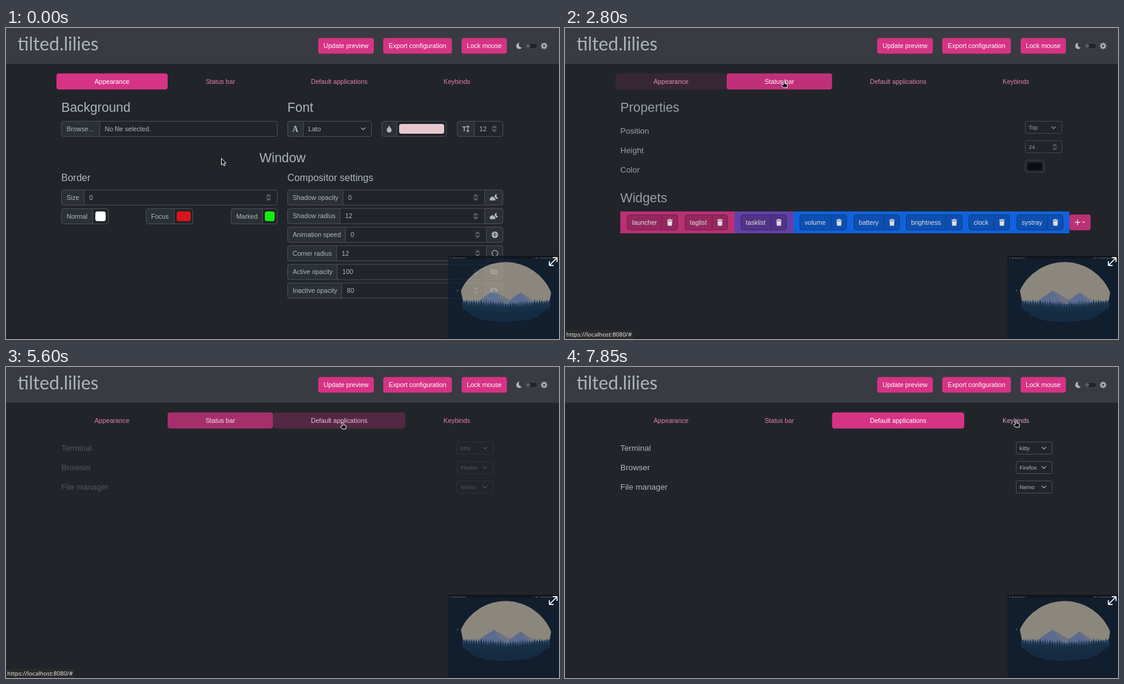
Recreate the animation shown at these times as an HTML page. Size 910 px wide and 512 px high, loop 8000 ms.

```html
<!DOCTYPE html>
<html lang="en">
<head>
<meta charset="utf-8">
<title>Desktop configurator</title>
<style>
html, body { margin: 0; width: 100%; height: 100%; overflow: hidden; background: #212529; }
svg { display: block; width: 910px; height: 512px; font-family: "Liberation Sans", Arial, sans-serif; }
text { white-space: pre; }
</style>
</head>
<body>
<svg id="stage" viewBox="0 0 910 512"></svg>
<script>
const GREY = '#adb5bd', PINK = '#d63384', LINE = '#495057', ADDON = '#2b3035';
const BODY = 10.667, SMALL = 9.333, LABEL = 13.333, SUB = 16, HEAD = 21.333;

// Drawing helpers; text is centred vertically on y, with its baseline on a whole pixel
const text = (x, y, s, size = BODY, fill = GREY, extra = '') =>
  `<text x="${x}" y="${Math.round(y + size * .355)}" font-size="${size}" fill="${fill}" ${extra}>${s}</text>`;
const centred = (x, y, s, size, fill, extra = '') => text(x, y, s, size, fill, 'text-anchor="middle" ' + extra);
const rect = (x, y, x2, y2, fill, r = 0, extra = '') =>
  `<rect x="${x}" y="${y}" width="${x2 - x}" height="${y2 - y}" rx="${r}" fill="${fill}" ${extra}/>`;
const path = (d, fill, extra = '') => `<path d="${d}" fill="${fill}" ${extra}/>`;
const stroke = (d, colour = GREY, w = 1.3) =>
  path(d, 'none', `stroke="${colour}" stroke-width="${w}" stroke-linecap="round" stroke-linejoin="round"`);
const at = (x, y, s) => `<g transform="translate(${x} ${y})">${s}</g>`;
const frame = (x, y, x2, y2, fill = 'none', line = LINE, r = 3.5) =>
  rect(x + .5, y + .5, x2 - .5, y2 - .5, fill, r, `stroke="${line}"`);
const chevron = (x, y) => stroke(`M${x - 3.3} ${y - 1.6}l3.3 3.3 3.3-3.3`, GREY, 1.2);
const spinner = (x, y) => rect(x - 4, y - 6, x + 4, y + 6, ADDON, 1) +
  stroke(`M${x - 2.5} ${y - 1.7}l2.5-2.5 2.5 2.5M${x - 2.5} ${y + 1.7}l2.5 2.5 2.5-2.5`, GREY, 1);

// Bordered field with a shaded cell on the left up to `split`
const group = (x, x2, y, split, label = '', value = '') => {
  const top = y - 13, bottom = y + 13;
  return rect(x, top, split, bottom, ADDON, 3.5) + frame(x, top, x2, bottom) +
    rect(split - 1, top, split, bottom, LINE) +
    text(x + 8.7, y, label) + text(split + 8, y, value);
};

const icons = {
  cloud: path('M-6 5a3 3 0 0 1 .5-5 3.5 3.5 0 0 1 6 .5 2.6 2.6 0 0 1 1 4.5z', GREY) +
    path('M1-1a4 4 0 0 1 4-4.5 4 4 0 0 0 2 6.5 4 4 0 0 1-3 1.5z', GREY),
  gauge: `<circle r="5.4" fill="${GREY}"/>` + stroke('M0 2.5V-2.5M-3 0h.1M3 0h.1', ADDON, 1.5),
  circle: `<circle r="4.8" fill="none" stroke="${GREY}" stroke-width="1.2"/>`,
  eye: path('M-6.5 0Q0-8.5 6.5 0Q0 8.5-6.5 0z', GREY) + `<circle r="2.6" fill="${ADDON}"/><circle r="1.3" fill="${GREY}"/>` +
    stroke('M-5.5-4.5L6.5 4.5', ADDON, 2.6) + stroke('M-6-4.8L6 4.8', GREY, 1.3),
  drop: path('M0-5.5C1 -2.5 4-.5 4 2a4 4 0 0 1-8 0C-4-.5-1-2.5 0-5.5z', GREY),
  trash: rect(-4.5, -4.5, 4.5, -3, '#fff', .5) + rect(-1.5, -5.5, 1.5, -4, '#fff', .5) + path('M-4-2.3h8l-.6 7.8h-6.8z', '#fff')
};

function header() {
  const button = (x, x2, label) => rect(x - .3, 16.6, x2 + .3, 42.2, PINK, 4) +
    centred((x + x2) / 2, 29.5, label, BODY, '#fff');
  let rays = '';
  for (let i = 0; i < 8; i++) rays += `<rect x="-1" y="-5.6" width="2" height="3" fill="${GREY}" transform="rotate(${i * 45})"/>`;
  return rect(0, 0, 910, 59, '#383b41') +
    `<text x="19" y="37" font-family="Lato, sans-serif" font-size="30" fill="${GREY}">tilted.lilies</text>` +
    button(514, 605, 'Update preview') + button(621, 733.5, 'Export configuration') + button(750, 824, 'Lock mouse') +
    at(844, 29.5, path('M1-5a5 5 0 1 0 4 7.6A4.6 4.6 0 0 1 1-5z', GREY)) +
    frame(856, 24.5, 875, 34.5, '#212529', LINE, 4.5) + '<circle cx="859.5" cy="29.5" r="3" fill="#5b6166"/>' +
    at(885.5, 29.5, rays + `<circle r="3.6" fill="${GREY}"/><circle r="1.7" fill="#373a3f"/>`);
}

function appearance() {
  const swatch = (x, x2, y, fill) => rect(x, y - 8, x2, y + 8, fill, 3.5);
  const rows = [
    ['Shadow opacity', 0, 555, 773, 788, 'cloud'], ['Shadow radius', 12, 550, 773, 788, 'cloud'],
    ['Animation speed', 0, 559, 776, 791, 'gauge'], ['Corner radius', 12, 544.5, 776, 791, 'circle'],
    ['Active opacity', 100, 545.5, 773, 788, 'eye'], ['Inactive opacity', 80, 553, 773, 788, 'eye']
  ].map(([label, value, split, spin, cell, icon], i) => {
    const y = 279 + i * 30.67;
    return group(463, 818, y, split, label, value) + spinner(spin, y) +
      frame(cell - 1, y - 13, 818, y + 13, ADDON) + at((cell + 818) / 2, y, icons[icon]);
  }).join('');
  return text(91, 130, 'Background', HEAD) + text(463, 130, 'Font', HEAD) +
    group(91, 447, 166, 154.5, 'Browse…', 'No file selected.') +
    group(463, 602, 166, 489.5, '', 'Lato') + chevron(588, 166) +
    centred(476, 166, 'A', 14, GREY, 'font-family="Liberation Serif, serif" font-weight="bold"') +
    group(618, 725, 166, 643.5) + at(630.5, 166, icons.drop) + swatch(647, 721, 166, '#e9c7cf') +
    group(742, 818, 166, 771, '', '12') + spinner(803.5, 166) +
    centred(754, 166, 'T', 11, GREY, 'font-weight="bold"') +
    stroke('M760 161.5v9M758.3 163l1.7-1.8 1.7 1.8M758.3 169l1.7 1.8 1.7-1.8', GREY, 1.2) +
    centred(455, 213.5, 'Window', HEAD) + text(91, 246.5, 'Border', SUB) + text(463, 246.5, 'Compositor settings', SUB) +
    group(91, 447, 279, 129, 'Size', '0') + spinner(432, 279) +
    group(91, 169, 310, 143, 'Normal') + swatch(147, 164, 310, '#fff') +
    group(230, 308, 310, 277, 'Focus') + swatch(281, 304, 310, '#dc141b') +
    group(370, 447, 310, 422.5, 'Marked') + swatch(426, 442, 310, '#10f010') + rows;
}

function statusBar() {
  const widget = (x, split, x2, label, fill, line) => frame(x, 307, x2, 333, fill, line, 4) +
    rect(split - .5, 307, split + .5, 333, line) + text(x + 8.5, 320, label, BODY, '#fff') +
    at((split + x2) / 2, 320, icons.trash);
  const blue = [[386, 438, 464, 'volume'], [475, 525, 551, 'battery'], [561, 627, 654, 'brightness'],
    [664, 706, 732, 'clock'], [743, 794, 820, 'systray']];
  return text(91, 130, 'Properties', HEAD) + text(91, 169, 'Position', LABEL) +
    text(91, 201, 'Height', LABEL) + text(91, 233, 'Color', LABEL) +
    frame(757, 153, 818, 174, 'none', LINE, 2.5) + text(763, 164, 'Top', SMALL) + chevron(804, 164) +
    frame(757, 185, 818, 206, 'none', LINE, 2.5) + text(763, 196, '24', SMALL) + spinner(806, 196) +
    frame(757, 217, 789, 238, 'none', LINE, 2.5) + rect(761, 222, 785, 234, '#070b10', 3.5) +
    text(91, 279, 'Widgets', HEAD) +
    rect(91, 302, 279, 338, PINK) + rect(279, 302, 376, 338, '#6f46c1') + rect(376, 302, 830, 338, '#0d6efd') +
    widget(102, 159, 186, 'launcher', '#ab296a', '#801f4f') + widget(197, 242, 268, 'taglist', '#ab296a', '#801f4f') +
    widget(289, 339, 365, 'tasklist', '#593799', '#432874') +
    blue.map(w => widget(...w, '#0a58ca', '#084298')).join('') +
    rect(830, 307, 865, 333, PINK, 4) + stroke('M839.5 320h8M843.5 316v8', '#fff', 1.4) + path('M851 318.7h5l-2.5 2.6z', '#fff');
}

const applications = () => [['Terminal', 'kitty'], ['Browser', 'Firefox'], ['File manager', 'Nemo']].map(([name, app], i) => {
  const y = 133.5 + 32 * i;
  return text(91, y, name, LABEL) + frame(742, y - 10.5, 802, y + 10.5, 'none', LINE, 2.5) +
    text(748, y, app, SMALL) + chevron(788, y);
}).join('');

// Translucent desktop preview in the corner
function preview() {
  const rand = i => { const v = Math.sin(i * 12.9898) * 43758.5453; return v - Math.floor(v); };
  const forest = (base, tall, seed, fill) => {
    let d = 'M751 456';
    for (let x = 752; x < 896; x += 4) {
      const rise = Math.abs(x - 822) / 14;
      d += `L${x} ${base - rise}L${x + 2} ${base - rise - tall * (.3 + .7 * rand(x + seed))}`;
    }
    for (let x = 896; x > 750; x -= 3)
      d += `L${x} ${484 - 26 * (Math.abs(x - 822) / 74) ** 3 - 3 * rand(x + 7)}`;
    return path(d + 'z', fill);
  };
  let specks = '';
  for (let i = 0; i < 24; i++) {
    const x = i < 10 ? 731 + i * 2.7 : 868 + (i - 10) * 2.4;
    specks += rect(x, 377.5 + rand(i), x + 1.2, 379 + rand(i + 50), '#9aa3ab');
  }
  return '<g opacity=".75">' + rect(728, 375, 910, 512, '#0c1d30') + rect(728, 375, 910, 379.5, '#0b1118') + specks +
    path('M748.5 432.5A81 81 0 0 1 897 435.5L893 460H754z', '#b0a898') +
    path('M770 457L785 444 803 432.5 817 441 829 448 847 435.5 866 448 880 458z', '#6f84b2') +
    path('M803 432.5L817 441 829 448 824 456 812 446zM847 435.5L866 448 880 458 860 452z', '#848ca3') +
    forest(456, 7, 3, '#3d5b86') + forest(461, 12, 40, '#143553') + forest(472, 10, 80, '#122e4a') +
    rect(742, 431.5, 744, 433, '#8c9ab0') + '</g>' +
    stroke('M894.5 390.5L906.5 378.5M900.5 378.2h6.3v6.3M894.2 384.5v6.3h6.3', '#fff', 1.7);
}

const tabs = [[83, 266, 'Appearance'], [266, 439.5, 'Status bar'], [439.5, 657, 'Default applications'], [657, 827, 'Keybinds']];
const panes = [appearance(), statusBar(), applications()];
const stage = document.getElementById('stage');
stage.innerHTML = rect(0, 0, 910, 512, '#212529') + header() +
  tabs.map(([x, x2, label], i) => rect(x, 74.7, x2, 101.3, PINK, 4, `id="bg${i}"`) +
    centred((x + x2) / 2, 88.5, label, BODY, '#fff', `id="tab${i}"`)).join('') +
  panes.map((p, i) => `<g id="pane${i}">${p}</g>`).join('') + preview() + rect(0, 510.5, 910, 512, '#191c20') +
  '<g id="url">' + path('M0 497.5h109a3 3 0 0 1 3 3V512H0z', '#2b2b2c') +
  '<text x="2" y="508" font-family="Noto Sans, sans-serif" font-size="9.6" fill="#e4e4e6">https://localhost:8080/#</text></g>' +
  path('M0 0V10.8L2.5 8.7 4.2 12.4 6.2 11.5 4.6 7.9H7.6z', '#111', 'id="arrow" stroke="#fff" stroke-width="1"') +
  path('M-1.2 5.8V.8a1.2 1.2 0 0 1 2.4 0V4l3.3.7q1.3.4 1 2L4.8 10.6H-1.2L-4 7.2q-.2-1.5 1.2-1.2z', '#111', 'id="hand" stroke="#fff" stroke-width="1"');

const el = id => document.getElementById(id);
const clamp = v => Math.min(1, Math.max(0, v));
const mix = (a, b, p) => `rgb(${a.map((v, i) => Math.round(v + (b[i] - v) * p))})`;
const ease = p => 1 - (1 - p) ** 2;

// Pointer hot spot: time, x, y
const route = [[0, 354, 214], [1350, 354, 214], [1650, 354, 122], [1800, 355, 103], [2200, 360, 87], [3800, 360, 87],
  [4000, 385, 90], [4250, 460, 95], [4450, 522, 94], [4550, 535, 93.5], [4650, 541, 93], [4950, 554, 91], [6650, 554, 91],
  [6850, 590, 97], [7200, 665, 106], [7450, 704, 106], [7650, 732, 94], [7850, 742, 88], [8000, 742, 88]];

function pointer(t) {
  const i = route.findIndex(k => k[0] > t), [t0, x0, y0] = route[i - 1], [t1, x1, y1] = route[i];
  const p = (t - t0) / (t1 - t0);
  return [x0 + (x1 - x0) * p, y0 + (y1 - y0) * p];
}

// When each tab starts to light up; its pane starts a little earlier
const starts = [-1000, 2715, 5581], LEAD = 25;

function draw(now) {
  const t = Math.floor(now % 8000 / 50) * 50;
  const [x, y] = pointer(t);
  const hot = y < 101 ? tabs.findIndex(([a, b]) => x >= a && x < b) : -1;
  const active = starts.filter(s => t >= s - LEAD).length - 1;
  const age = t - starts[active];
  const lit = ease(clamp(age / 130)), shown = clamp((age + LEAD) / 130);

  tabs.forEach((_, i) => {
    const p = i === active ? lit : i === active - 1 ? 1 - lit : 0;
    el('bg' + i).setAttribute('opacity', p);
    el('tab' + i).setAttribute('fill', mix(i === hot ? [235, 160, 198] : [226, 125, 175], [255, 255, 255], p));
  });
  panes.forEach((_, i) => el('pane' + i).setAttribute('opacity', i === active ? shown : 0));

  el('url').setAttribute('opacity', hot >= 0 && t < 7400 ? 1 : 0);
  for (const id of ['arrow', 'hand']) {
    el(id).setAttribute('transform', `translate(${Math.round(x) + .5} ${Math.round(y) + .5})`);
    el(id).setAttribute('opacity', (id === 'hand') === (hot >= 0) ? 1 : 0);
  }
  requestAnimationFrame(() => draw(performance.now() - begin));
}
const begin = performance.now();
draw(0);
</script>
</body>
</html>
```
